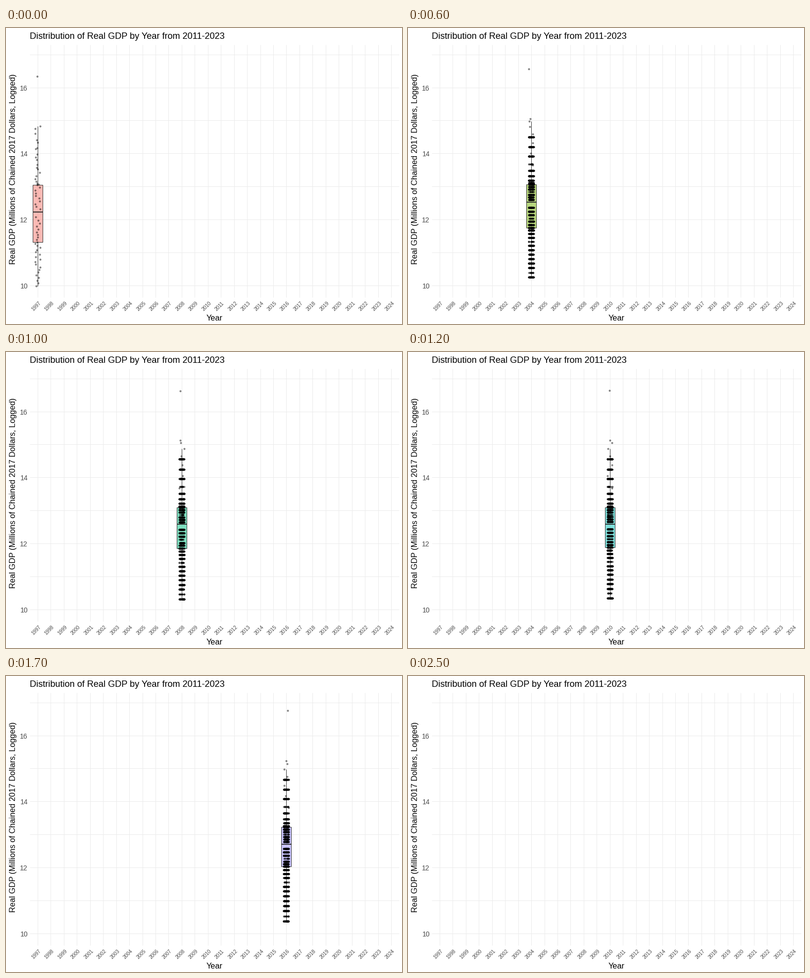
Animation, 800 px wide and 600 px high, one loop 2600 ms. Source, as a matplotlib script:

```python
import math

import matplotlib.pyplot as plt
import numpy as np
from matplotlib.animation import FuncAnimation
from matplotlib.patches import Rectangle

W, H, DPI = 800, 600, 100
FRAMES, INTERVAL = 26, 100
FIRST, LAST = 1997, 2024
PX = 72 / DPI  # points per pixel
INK, GRID, GREY = "#333333", "#EBEBEB", "#4D4D4D"

# Key heights in pixels: outlier, highest, box top, median, box bottom, lowest.
KEY_YEARS = [1997, 2002, 2006, 2010, 2020, 2023]
KEY_HEIGHTS = np.array([
    (97, 198, 317, 372, 433, 522),
    (87, 188, 317, 356, 408, 508),
    (78, 178, 314, 349, 399, 501),
    (77, 178, 314, 348, 395, 498),
    (64, 167, 299, 334, 379, 495),
    (57, 158, 296, 329, 373, 490),
])


def year_x(year):
    return round(63.9 + 26.45 * (year - FIRST))


def hue_color(index, count, lum=65, chroma=100):
    """Evenly spaced hue in polar LUV space, as sRGB."""
    hue = math.radians(15 + 360 * index / count)
    y = ((lum + 16) / 116) ** 3
    u = chroma * math.cos(hue) / (13 * lum) + 0.1978
    v = chroma * math.sin(hue) / (13 * lum) + 0.4683
    x = 9 * y * u / (4 * v)
    z = -x / 3 - 5 * y + 3 * y / v
    linear = np.array([
        3.2405 * x - 1.5371 * y - 0.4985 * z,
        -0.9693 * x + 1.8760 * y + 0.0416 * z,
        0.0556 * x - 0.2040 * y + 1.0572 * z,
    ]).clip(0, 1)
    return np.where(linear > 0.00304,
                    1.055 * linear ** (1 / 2.4) - 0.055, 12.92 * linear)


def key_heights(year):
    return [np.interp(year, KEY_YEARS, column) for column in KEY_HEIGHTS.T]


def spread(start, end, count, power=1.0):
    t = np.arange(1, count + 1) / count
    return start + (end - start) * t ** power


def row_heights(year):
    """Heights of the rows of dots and of the lone dots above them."""
    outlier, high, top, middle, bottom, low = key_heights(year)
    density = 1.5 if year == FIRST else 1
    rows = np.concatenate([
        spread(start, end, round(count * density), power)
        for start, end, count, power in (
            (top, top + 0.72 * (high - top), 8, 1.8),
            (middle, top, 7, 1),
            (middle, bottom, 7, 0.8),
            (bottom, low, 12, 1.15),
        )
    ])
    lone = high + 0.71 * (top - high) * np.linspace(0, 1, 7) ** 1.6
    return rows.round(), np.append(lone, outlier).round()


def dot_positions(year):
    rows, lone = row_heights(year)
    rng = np.random.default_rng(year)
    if year == FIRST:
        counts = np.ones(len(rows), int)
    else:
        sparse = np.arange(len(rows)) % 7 == 4
        counts = np.where(sparse, 12, 45)
    y = np.concatenate([np.repeat(rows, counts), lone])
    return year_x(year) + rng.uniform(-5.3, 5.3, len(y)).round(), y


plt.rcParams["font.family"] = "Liberation Sans"
fig = plt.figure(figsize=(W / DPI, H / DPI), dpi=DPI, facecolor="white")
ax = fig.add_axes([0, 0, 1, 1])
# Whole numbers fall just short of pixel centres, so lines snap onto them.
ax.set_xlim(-0.4, W - 0.4)
ax.set_ylim(H - 0.6, -0.6)
ax.axis("off")


def line(xs, ys, color, width=1, z=1):
    return ax.plot(xs, ys, color=color, lw=width * PX, zorder=z,
                   solid_capstyle="butt")[0]


def label(x, y, text, size, color="black", ha="center", angle=0):
    ax.text(x, y, text, fontsize=size * PX, color=color, ha=ha, va="baseline",
            rotation=angle, rotation_mode="anchor")


def draw_axes():
    for value in range(10, 18):
        y = round(521 - 66.9 * (value - 10))
        line([48, 794], [y, y], GRID)
        if value % 2 == 0:
            label(43.5, y + 6, str(value), 14, GREY, "right")
    for year in range(FIRST, LAST + 1):
        x = year_x(year)
        line([x, x], [33, 545.5], GRID)
        label(x - 1.5, 565.5, str(year), 10, GREY, angle=45)
    label(47.5, 21, "Distribution of Real GDP by Year from 2011-2023", 18.1,
          ha="left")
    label(420.5, 592, "Year", 16.2)
    label(19, 285.5, "Real GDP (Millions of Chained 2017 Dollars, Logged)",
          16.2, angle=90)


def draw_box(year):
    x = year_x(year)
    top, middle, bottom, low = np.round(key_heights(year)[2:])
    heights = np.concatenate(row_heights(year))
    fence = top - 1.5 * (bottom - top)
    whisker = heights[heights >= fence].min()
    box = Rectangle((x - 10, top), 20, bottom - top, edgecolor=INK, lw=PX,
                    facecolor=(*hue_color(year - FIRST, LAST - FIRST), 0.5),
                    zorder=3)
    ax.add_patch(box)
    return [
        box,
        line([x, x], [whisker, top], INK, z=3),
        line([x, x], [bottom, low], INK, z=3),
        line([x - 10, x + 10], [middle, middle], INK, 2, z=4),
    ]


def draw_dots(year):
    return ax.scatter(*dot_positions(year), s=(2.9 * PX) ** 2,
                      facecolors=[(0, 0, 0, 0.3)],
                      edgecolors=[(0, 0, 0, 0.52)],
                      linewidths=PX, zorder=5)


shown = []


def update(frame):
    while shown:
        shown.pop().remove()
    year = FIRST + math.ceil(frame * (LAST - FIRST) / (FRAMES - 1))
    if year < LAST:  # the last year has no data
        shown.extend(draw_box(year))
        shown.append(draw_dots(year))
    return shown


draw_axes()
anim = FuncAnimation(fig, update, frames=FRAMES, interval=INTERVAL,
                     init_func=lambda: update(0), repeat=True, repeat_delay=0,
                     blit=False)
plt.show()
```
